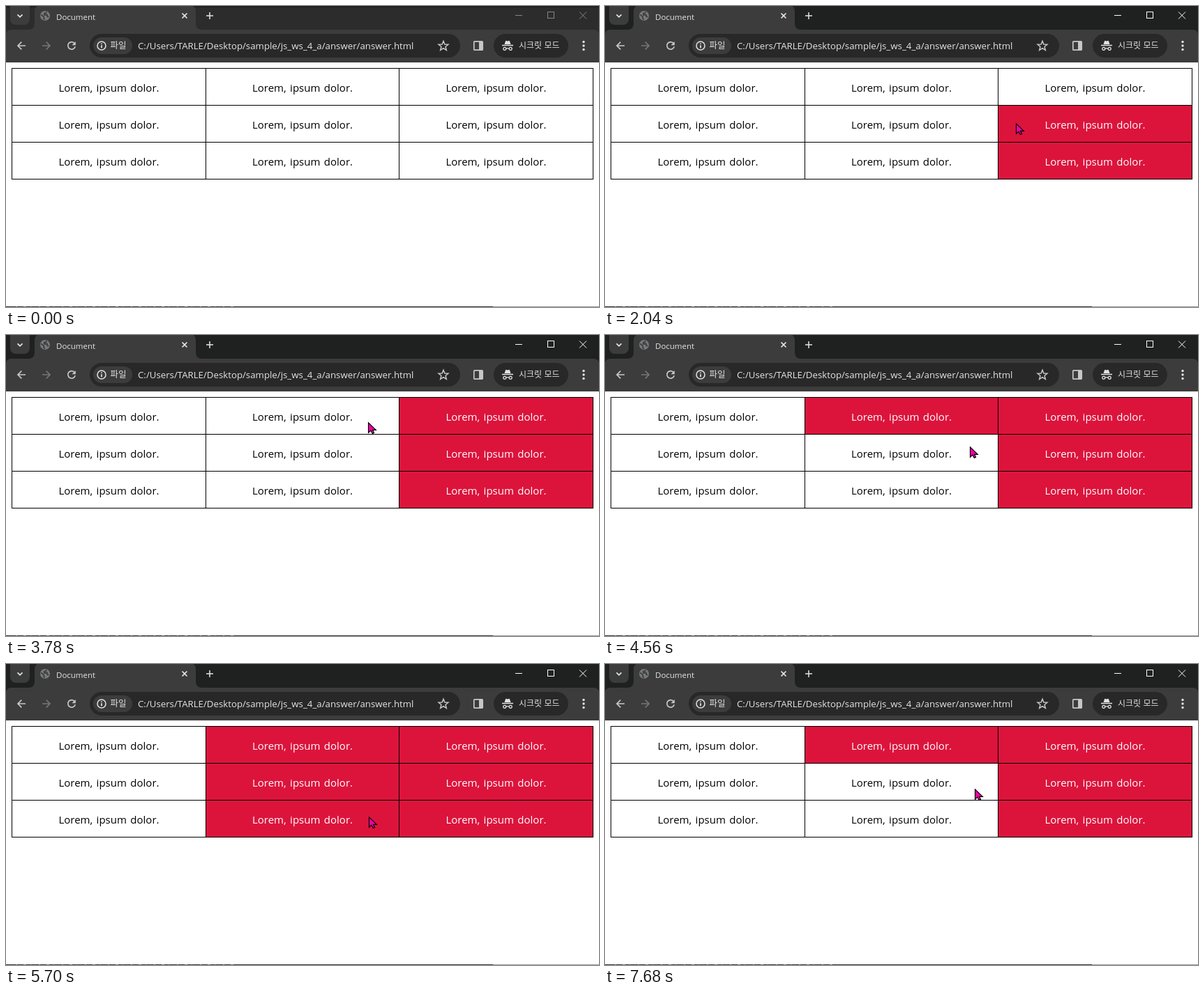
These frames come from a looping animation (850 by 432 pixels, 8000 ms). An HTML page:

```html
<!DOCTYPE html>
<html lang="ko">
<head>
<meta charset="utf-8">
<title>Document</title>
<style>
  html, body { margin: 0; width: 100%; height: 100%; overflow: hidden; background: #fff; }
  svg { display: block; width: 850px; height: 432px; }
  text { font-family: "Open Sans", "Noto Sans", "Noto Sans CJK KR", "Noto Sans CJK", sans-serif; fill: #e3e3e3; white-space: pre; }
  .ko { font-family: "Noto Sans CJK KR", "Noto Sans CJK", sans-serif; }
  .cell { font-size: 15px; word-spacing: 1.5px; text-anchor: middle; }
  .icon { fill: none; stroke: #c7c7c7; stroke-width: 1.7; }
</style>
</head>
<body>
<svg id="stage" viewBox="0 0 850 432">
  <rect width="850" height="432" fill="#fff"/>

  <!-- tab strip -->
  <rect width="850" height="44" fill="#1f2020"/>
  <rect id="strip" y="2" width="850" height="42" fill="#2c2c2c"/>
  <path d="M6 0H34V19a8 8 0 0 1-8 8H14a8 8 0 0 1-8-8Z" fill="#3c3c3c"/>
  <path class="icon" d="M16.5 12.3l3.5 3.5 3.5-3.5" style="stroke:#e3e3e3"/>
  <path d="M32 34q9 0 9-9V7q0-5 4-7H268q4 2 4 7V25q0 9 9 9Z" fill="#3c3c3c"/>
  <circle cx="56" cy="14" r="7" fill="#777a7d"/>
  <path d="M50.3 12.5l4 3.2v2.6l1.6 1.3M57.5 8.3v2.4h-2.6v2.2h4.3v2.6h2.4" fill="none" stroke="#3c3c3c" stroke-width="1.7"/>
  <text x="72" y="20" font-size="11.5">Document</text>
  <path class="icon" d="M252.5 10.5l7 7m0-7l-7 7" style="stroke:#e3e3e3"/>
  <path class="icon" d="M287 14h10m-5-5v10" style="stroke:#e3e3e3;stroke-width:1.5"/>
  <g id="buttons" fill="none">
    <path d="M730 13.5h10M776.5 8.5h9v9h-9z" shape-rendering="crispEdges"/>
    <path d="M822 8.5l10 10m0-10l-10 10"/>
  </g>

  <!-- toolbar -->
  <path d="M0 81V42q0-8 8-8H842q8 0 8 8V81Z" fill="#3c3c3c"/>
  <path class="icon" d="M28 57H17.5M22.3 51.7L17 57l5.3 5.3"/>
  <path class="icon" d="M52 57h10.500M57.700 51.700L63 57l-5.300 5.300" style="stroke:#757575"/>
  <path class="icon" d="M98.300 53.600a5.300 5.300 0 1 0 .9 4.700"/>
  <path d="M99.800 51v5.300h-5.300Z" fill="#c7c7c7"/>
  <rect x="120" y="40" width="531" height="34" rx="17" fill="#282828"/>
  <rect x="125" y="45" width="56" height="24" rx="12" fill="#3c3c3c"/>
  <circle class="icon" cx="137" cy="57" r="6" style="stroke:#e3e3e3;stroke-width:1.5"/>
  <path class="icon" d="M137 56.300v4M137 53.400v1.700" style="stroke:#e3e3e3"/>
  <text class="ko" x="149.500" y="61.300" font-size="12.500">파일</text>
  <text x="189" y="62" font-size="13.250">C:/Users/TARLE/Desktop/sample/js_ws_4_a/answer/answer.html</text>
  <path id="star" class="icon" style="stroke-width:1.500"/>
  <rect class="icon" x="670.800" y="50.800" width="12.400" height="12.400" rx="1"/>
  <path d="M678 51h5v12h-5Z" fill="#c7c7c7"/>
  <rect x="699" y="40" width="107" height="34" rx="17" fill="#282828"/>
  <g fill="#e3e3e3">
    <path d="M714.500 55l1.500-4.500q.4-1 1.400-.6l1.600.5 1.600-.5q1-.4 1.400.6l1.500 4.500ZM711 55.700h16v1.500h-16Z"/>
    <path d="M714.800 58.700a2.700 2.700 0 1 0 .01 0Zm0 1.300a1.400 1.400 0 1 1-.01 0ZM723.200 58.700a2.700 2.700 0 1 0 .01 0Zm0 1.300a1.400 1.400 0 1 1-.01 0Z" fill-rule="evenodd"/>
    <path d="M717 60.500q2-1 4 0v1.200q-2-1-4 0Z"/>
    <circle cx="828" cy="51.500" r="1.700"/><circle cx="828" cy="57" r="1.700"/><circle cx="828" cy="62.500" r="1.700"/>
  </g>
  <text class="ko" x="735" y="61.300" font-size="12">시크릿 모드</text>

  <!-- page -->
  <g id="table"></g>
  <path d="M8 89.500H842M8 142.500H842M8 195.500H842M8 248.500H842M8.500 89V249M286.500 89V249M563.500 89V249M841.500 89V249" stroke="#000" shape-rendering="crispEdges"/>
  <path d="M0 431H698V432H0Z" fill="#343434"/>
  <path d="M698 431H850V432H698Z" fill="#9a9a9a"/>
  <path d="M14 431.500H330" stroke="#777" stroke-dasharray="2 9 4 6 1 11"/>

  <path id="cursor" d="M.5 .8V15.300L3.900 12.100 6.300 16.500 8.500 15.500 6.600 11.300H11.300Z" fill="#f000a8" stroke="#000" stroke-width="1.200"/>
</svg>
<script>
const LOOP = 8000, TICK = 60, FOCUS = 1080;
const $ = id => document.getElementById(id);
const columns = [8, 286, 563, 841];
const rows = [89, 142, 195, 248];

// [row, column, filled at, cleared at]
const fills = [
  [2, 2, 1140], [1, 2, 2040], [0, 2, 2940],
  [0, 1, 4080], [1, 1, 4920, 7680], [2, 1, 5700, 6720]
];

// [start, end, from, to]; the pointer rests between moves
const moves = [
  [240, 780, [838, 318], [580, 237]],
  [780, 900, [580, 237], [585, 231]],
  [1500, 1740, [585, 231], [589, 168]],
  [2340, 2700, [589, 168], [594, 125]],
  [3540, 3780, [594, 125], [519, 125]],
  [4320, 4560, [519, 125], [523, 160]],
  [5160, 5460, [523, 160], [520, 219]],
  [7200, 7440, [520, 219], [530, 179]]
];

function add(parent, tag, attrs, label = "") {
  const node = document.createElementNS("http://www.w3.org/2000/svg", tag);
  for (const key in attrs) node.setAttribute(key, attrs[key]);
  node.textContent = label;
  return parent.appendChild(node);
}

const cells = rows.slice(0, 3).map((y, r) => columns.slice(0, 3).map((x, c) => ({
  box: add($("table"), "rect", { x: x + 1, y: y + 1, width: columns[c + 1] - x - 1, height: 52 }),
  label: add($("table"), "text", { class: "cell", x: (x + columns[c + 1] + 1) / 2, y: y + 34 }, "Lorem, ipsum dolor.")
})));

const starPoints = Array.from({ length: 10 }, (_, i) => {
  const angle = i * Math.PI / 5 - Math.PI / 2, radius = i % 2 ? 3.2 : 7.3;
  return `${627 + radius * Math.cos(angle)} ${57.5 + radius * Math.sin(angle)}`;
});
$("star").setAttribute("d", `M${starPoints.join("L")}Z`);

const ease = p => p * p * (3 - 2 * p);

function pointerAt(time) {
  const move = moves.filter(m => time >= m[0]).pop();
  if (!move) return null;
  const [start, end, from, to] = move;
  const p = ease(Math.min(1, (time - start) / (end - start)));
  return from.map((v, i) => Math.round(v + (to[i] - v) * p));
}

function render(time) {
  const focused = time >= FOCUS;
  $("strip").setAttribute("fill", focused ? "#1f2020" : "#2c2c2c");
  $("buttons").setAttribute("stroke", focused ? "#fff" : "#858585");

  cells.flat().forEach(({ box, label }) => {
    box.setAttribute("fill", "#fff");
    label.style.fill = "#000";
  });
  for (const [r, c, on, off = LOOP] of fills) {
    if (time < on || time >= off) continue;
    cells[r][c].box.setAttribute("fill", "#dc143c");
    cells[r][c].label.style.fill = "#fff";
  }

  const pointer = pointerAt(Math.floor(time / TICK) * TICK);
  $("cursor").setAttribute("visibility", pointer ? "visible" : "hidden");
  if (pointer) $("cursor").setAttribute("transform", `translate(${pointer})`);
}

const origin = performance.now();
function frame() {
  render((performance.now() - origin) % LOOP);
  requestAnimationFrame(frame);
}
frame();
</script>
</body>
</html>
```
